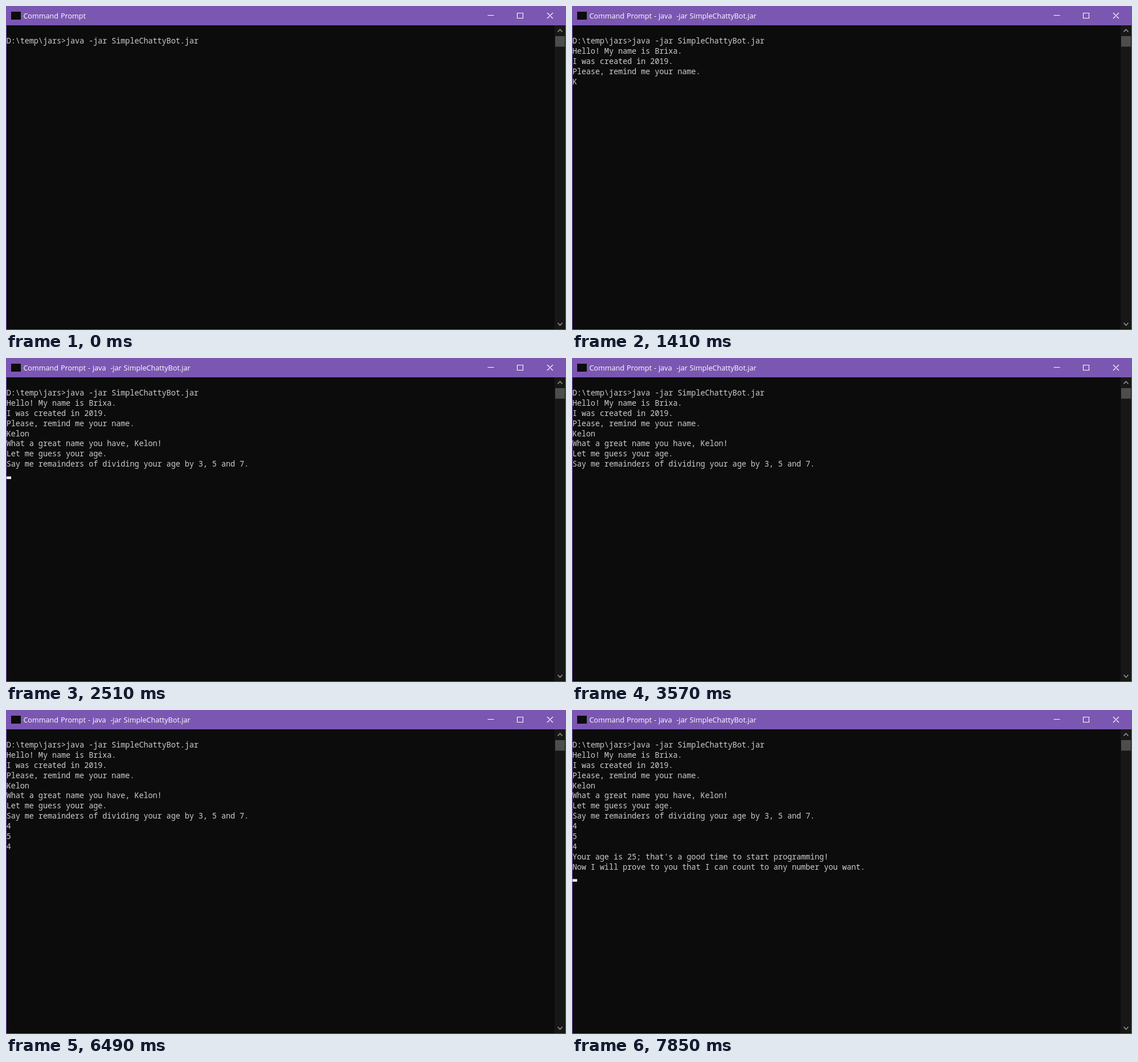
An HTML page for the animation above (8000 ms loop, 983x570 px).

```html
<!DOCTYPE html>
<html lang="en">
<head>
<meta charset="utf-8">
<title>Console session</title>
<style>
  html, body { margin: 0; width: 100%; height: 100%; overflow: hidden; background: #0c0c0c; }
  svg { display: block; width: 983px; height: 570px; }
  text { white-space: pre; }
  #title { font: 12.65px "Open Sans", "Noto Sans", sans-serif; word-spacing: .6px; fill: #fff; }
  #rows { font: 13.6px "Noto Sans Mono", "DejaVu Sans Mono", monospace; letter-spacing: -.13px; fill: #ccc; }
  .line { fill: none; stroke: #fff; stroke-width: 1.1; }
  .arrow { fill: none; stroke: #8c8c8c; stroke-width: 1.7; }
</style>
</head>
<body>
<svg viewBox="0 0 983 570">
  <rect width="983" height="570" fill="#7b57b2"/>
  <rect x="1" y="34" width="981" height="535" fill="#0c0c0c"/>
  <rect x="9" y="10" width="17" height="14" fill="#0c0c0c"/>
  <text id="title" x="30.4" y="22"></text>
  <path class="line" d="M845.5 16.5H856.5M897.5 12.5H907.5V21.5H897.5ZM950 12L960 22M960 12L950 22"/>
  <rect x="963" y="34" width="19" height="535" fill="#171717"/>
  <rect x="964" y="53" width="17" height="18.5" fill="#4d4d4d"/>
  <path class="arrow" d="M968.5 45.5L972.5 41.3L976.5 45.5M968.5 557.5L972.5 561.7L976.5 557.5"/>
  <g id="rows"></g>
  <rect id="cursor" width="8" height="4.6" fill="#f2f2f2"/>
</svg>
<script>
const LOOP = 8000, TOP = 34, LEFT = .9, CELL = 8.03, PITCH = 17.87;
const COMMAND = "java -jar SimpleChattyBot.jar";
const USER = "Kelon", BOT = "Brixa";

// [time in ms, text added to the console, cursor visible]
const events = [
  [0, "\nD:\\temp\\jars>" + COMMAND, 0],
  [230, "", 1],
  [430, "\n", 1],
  [460, `Hello! My name is ${BOT}.\nI was created in 2019.\nPlease, remind me your name.\n`, 1],
  [720, "", 0], [1050, "", 1], [1310, "", 0],
  [1400, USER[0], 0], [1480, USER[1], 0], [1570, "", 1],
  [1650, USER[2], 1], [1740, USER[3], 1], [1850, USER[4], 1],
  [2110, "", 0], [2410, "", 1],
  [2460, `\nWhat a great name you have, ${USER}!\nLet me guess your age.\n` +
    "Say me remainders of dividing your age by 3, 5 and 7.\n", 0],
  [2510, "", 1], [2910, "", 0], [3210, "", 1], [3570, "", 0],
  [3800, "4", 0], [4100, "", 1], [4200, "\n", 1],
  [4400, "", 0], [4660, "", 1], [4920, "", 0],
  [5120, "5", 0], [5380, "", 1], [5410, "\n", 1], [5670, "", 0],
  [6000, "4", 1], [6260, "", 0],
  [6520, "\nYour age is 25; that's a good time to start programming!\n" +
    "Now I will prove to you that I can count to any number you want.\n", 1],
  [7020, "", 0], [7320, "", 1], [7550, "", 0], [7850, "", 1]
];

const find = id => document.getElementById(id);
const title = find("title"), rows = find("rows"), cursor = find("cursor");

const rowNodes = Array.from({ length: 16 }, (_, i) => {
  const node = document.createElementNS("http://www.w3.org/2000/svg", "text");
  node.setAttribute("x", LEFT - .2);
  node.setAttribute("y", TOP + i * PITCH + 14.2);
  return rows.appendChild(node);
});

function draw(time) {
  const past = events.filter(e => e[0] <= time);
  const lines = past.map(e => e[1]).join("").split("\n");
  const last = lines.length - 1;

  rowNodes.forEach((node, i) => { node.textContent = lines[i] || ""; });
  title.textContent = "Command Prompt" + (last > 1 ? " - " + COMMAND.replace(" ", "  ") : "");

  cursor.setAttribute("x", Math.round(LEFT + lines[last].length * CELL));
  cursor.setAttribute("y", Math.round(TOP + (last + 1) * PITCH) - 4.6);
  cursor.setAttribute("visibility", past[past.length - 1][2] ? "visible" : "hidden");
}

const start = performance.now();
function tick() {
  draw((performance.now() - start) % LOOP);
  requestAnimationFrame(tick);
}
tick();
</script>
</body>
</html>
```
